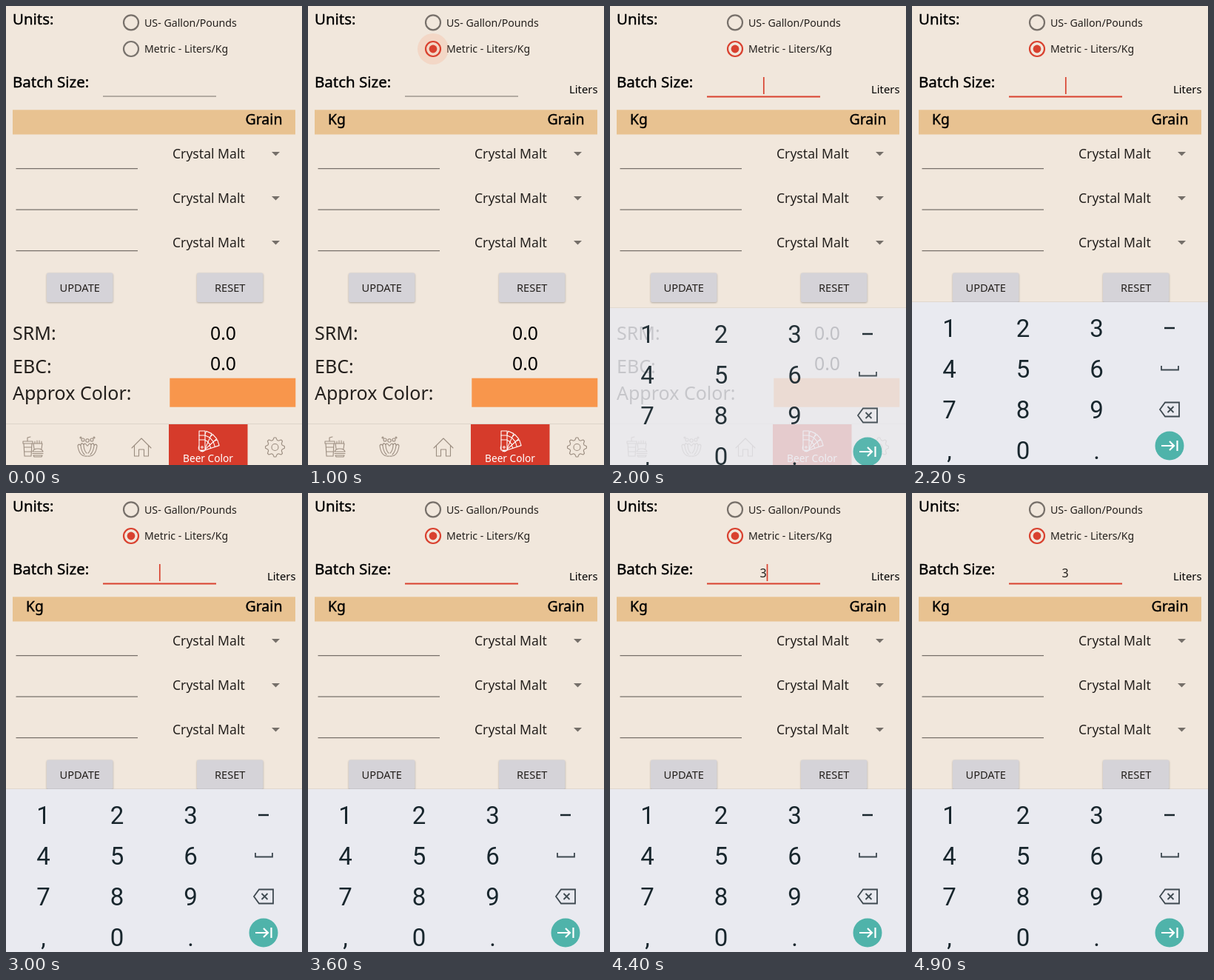
Write an HTML page that moves like this. It is 400 by 620 pixels and loops after 5 s.

```html
<!DOCTYPE html>
<html lang="en">
<head>
<meta charset="utf-8">
<title>Beer Color</title>
<style>
  html, body { margin: 0; width: 100%; height: 100%; overflow: hidden; background: #f1e7dc; }
  svg { display: block; width: 400px; height: 620px; font-family: "Noto Sans", sans-serif; }
  .strong { stroke: #000; stroke-width: .4; }
  .soft { fill: #24201d; }
  .line { fill: none; stroke: #77706a; stroke-width: 1.1; }
  .red { fill: none; stroke: #d9412f; stroke-width: 2; }
  .icon { fill: none; stroke: #9b8d80; stroke-width: 1.1; stroke-linejoin: round; stroke-linecap: round; }
  .button { fill: #d5d3d8; filter: drop-shadow(0 1.5px 1.2px #0004); }
  .key { font: 33px Roboto, sans-serif; fill: #18262d; text-anchor: middle; }
  .sign { fill: none; stroke: #3e4950; stroke-width: 1.8; }
</style>
</head>
<body>
<svg viewBox="0 0 400 620">
  <rect width="400" height="620" fill="#f1e7dc"/>
  <rect x="9" y="140.3" width="382" height="33.2" fill="#e8c291"/>
  <rect x="221.300" y="502.700" width="170" height="39" fill="#f8964c"/>
  <g id="form"></g>

  <circle id="ripple" cx="169" cy="58" fill="#f6a27c" fill-opacity=".24"/>
  <circle class="line" cx="169" cy="22.3" r="10" style="stroke-width:2.2"/>
  <circle id="ring" cx="169" cy="58" r="10" fill="none" stroke-width="2.2"/>
  <circle id="dot" cx="169" cy="58" r="5.4" fill="#d9412f"/>

  <path id="idleLine" class="line" d="M131 122H284"/>
  <path id="activeLine" class="red" d="M131 122.5H284"/>
  <path id="cursor" class="red" d="M0 96V119" style="stroke-width:1.7"/>

  <path d="M0 564.5H400" stroke="#ddd4ca"/>
  <rect x="220" y="565" width="106.500" height="55" fill="#d63b2b"/>
  <text x="273" y="616" font-size="13.7" text-anchor="middle" fill="#fff">Beer Color</text>
  <!-- food, cupped hands, house, swatches, gear -->
  <g class="icon">
    <path d="M24 591H35L34 608H25ZM23 591V588H36V591M29 588V583L33 582M25 596H34M25 602H34
             M38 598L37 591H49L48 598M39 591V588M42 591V587M45 591V587M48 591V588
             M36 602Q37 598 43 598Q49 598 50 602ZM36 604.500H50M37 607L38 609H48L49 607Z"/>
    <g id="hand">
      <path d="M109.500 608C101 609 98 602 97 594C98 591 100 592 101 594C101 590 104 590 105 593
               C106 590 108 591 109.500 594M101 594Q102 602 106 606M105 593Q105 600 109 604"/>
      <circle cx="104" cy="586" r="2"/><circle cx="101" cy="583" r="1"/>
    </g>
    <use href="#hand" transform="matrix(-1 0 0 1 220 0)"/>
    <circle cx="110" cy="587" r="2.200"/>
    <path d="M170 597L183 584L196 597M173.500 594V608H179.500V599H186.500V608H192.500V594"/>
    <g id="swatches" stroke="#fff" fill="#d63b2b"></g>
    <path id="gear"/><circle cx="363.500" cy="596" r="4.500"/>
  </g>

  <g id="keyboard">
    <g id="backdrop">
      <rect y="399" width="400" height="240" fill="#0001"/>
      <rect y="400" width="400" height="240" fill="#e9eaf0"/>
    </g>
    <g id="controls">
      <g id="keys"></g>
      <path class="sign" d="M341 435H355" style="stroke:#18262d;stroke-width:2.500"/>
      <path class="sign" d="M337 486V491.500H360V486"/>
      <path class="sign" d="M335 545L342 535.500H361V554.500H342ZM345.500 541L353.500 549M353.500 541L345.500 549"/>
      <circle cx="348" cy="594" r="19.500" fill="#4fb3aa"/>
      <path d="M337 594H354M348 588L354 594L348 600M358.500 587V601" fill="none" stroke="#fff" stroke-width="2.200"/>
    </g>
  </g>
</svg>
<script>
const el = id => document.getElementById(id);
const show = (id, on) => el(id).style.display = on ? '' : 'none';
const label = (text, x, y, size, attrs = '') =>
  `<text x="${x}" y="${y}" font-size="${size}" ${attrs}>${text}</text>`;
const strong = 'class="strong"', soft = 'class="soft"';
const middle = 'text-anchor="middle"', end = 'text-anchor="end"';

const button = (text, x) =>
  `<rect class="button" x="${x}" y="360.5" width="89.5" height="39.5" rx="2"/>` +
  label(text, x + 44.7, 386, 14.6, `${middle} ${soft}`);

const grainRow = row => {
  const y = 206 + row * 60;
  return `<path class="line" d="M13.5 ${219.6 + row * 55.5}H178"/>` +
    label('Crystal Malt', 225, y, 17.6, soft) +
    `<path d="M359 ${y - 9}h11l-5.5 5.5z" fill="#756f69"/>`;
};

el('form').innerHTML =
  label('Units:', 9, 25, 20.4, strong) +
  label('US- Gallon/Pounds', 187, 27.5, 14.2, soft) +
  label('Metric - Liters/Kg', 187, 63, 14.1, soft) +
  label('Batch Size:', 9, 109.5, 20.5, strong) +
  label('Grain', 373.5, 160, 19.6, `${strong} ${end}`) +
  label('Kg', 27, 160, 19.2, `${strong} id="kg"`) +
  label('Liters', 391.5, 118, 14.8, `${end} id="liters"`) +
  label('3', 207, 114, 16, `${middle} ${soft} id="typed"`) +
  [0, 1, 2].map(grainRow).join('') +
  button('UPDATE', 55) + button('RESET', 258) +
  label('SRM:', 9, 450.5, 25, soft) + label('0.0', 293.5, 451, 24.8, middle) +
  label('EBC:', 9, 496, 25, soft) + label('0.0', 293.5, 492, 24.8, middle) +
  label('Approx Color:', 9, 532, 25, soft);

el('keys').innerHTML = ['123', '456', '789', ',0.'].flatMap((row, r) =>
  [...row].map((char, c) =>
    `<text class="key" x="${50.5 + c * 99.5}" y="${447 + r * 55}">${char}</text>`)).join('');

el('swatches').innerHTML = [72, 48, 24, 0].map(angle =>
  `<g transform="rotate(${angle} 265 597)">
    <rect x="261" y="574" width="8" height="26"/><path d="M261 580h8M261 586h8"/></g>`).join('') +
  '<circle cx="265" cy="596" r="1.2"/>';

// Eight teeth, four corners each
el('gear').setAttribute('d', 'M' + Array.from({ length: 32 }, (_, i) => {
  const angle = (i - 1.5) * Math.PI / 16, radius = i % 4 === 1 || i % 4 === 2 ? 13 : 10;
  return `${363.5 + radius * Math.cos(angle)} ${596 + radius * Math.sin(angle)}`;
}).join('L') + 'Z');

const LOOP = 5000, STEP = 100;
const CHECK = 700, FOCUS = 1800, TYPE = 4300, BLINK = 600;

function draw(elapsed) {
  const t = Math.floor(elapsed % LOOP / STEP) * STEP;
  const checked = t >= CHECK, focused = t >= FOCUS, typed = t >= TYPE;

  show('ripple', t >= 600 && t < 1200);
  el('ripple').setAttribute('r', Math.max(0, Math.min(21, 12 + (t - 600) * .045)));
  el('ring').setAttribute('stroke', checked ? '#d9412f' : '#79736d');
  for (const id of ['dot', 'kg', 'liters']) show(id, checked);

  show('idleLine', !focused);
  show('activeLine', focused);
  show('typed', typed);
  const blinkStart = typed ? TYPE : FOCUS;
  show('cursor', focused && Math.floor((t - blinkStart) / BLINK) % 2 === 0);
  el('cursor').setAttribute('transform', `translate(${typed ? 212.5 : 207.8})`);

  const progress = Math.min(1, Math.max(0, (t - 1900) / 200));
  const rest = (1 - progress) ** 3;
  show('keyboard', progress > 0);
  el('backdrop').setAttribute('opacity', 1 - rest * 1.4);
  el('controls').setAttribute('opacity', 1 - rest * .5);
  el('keyboard').setAttribute('transform', `translate(0 ${rest * 64})`);
}

const start = performance.now();
function tick() {
  draw(performance.now() - start);
  requestAnimationFrame(tick);
}
tick();
</script>
</body>
</html>
```
